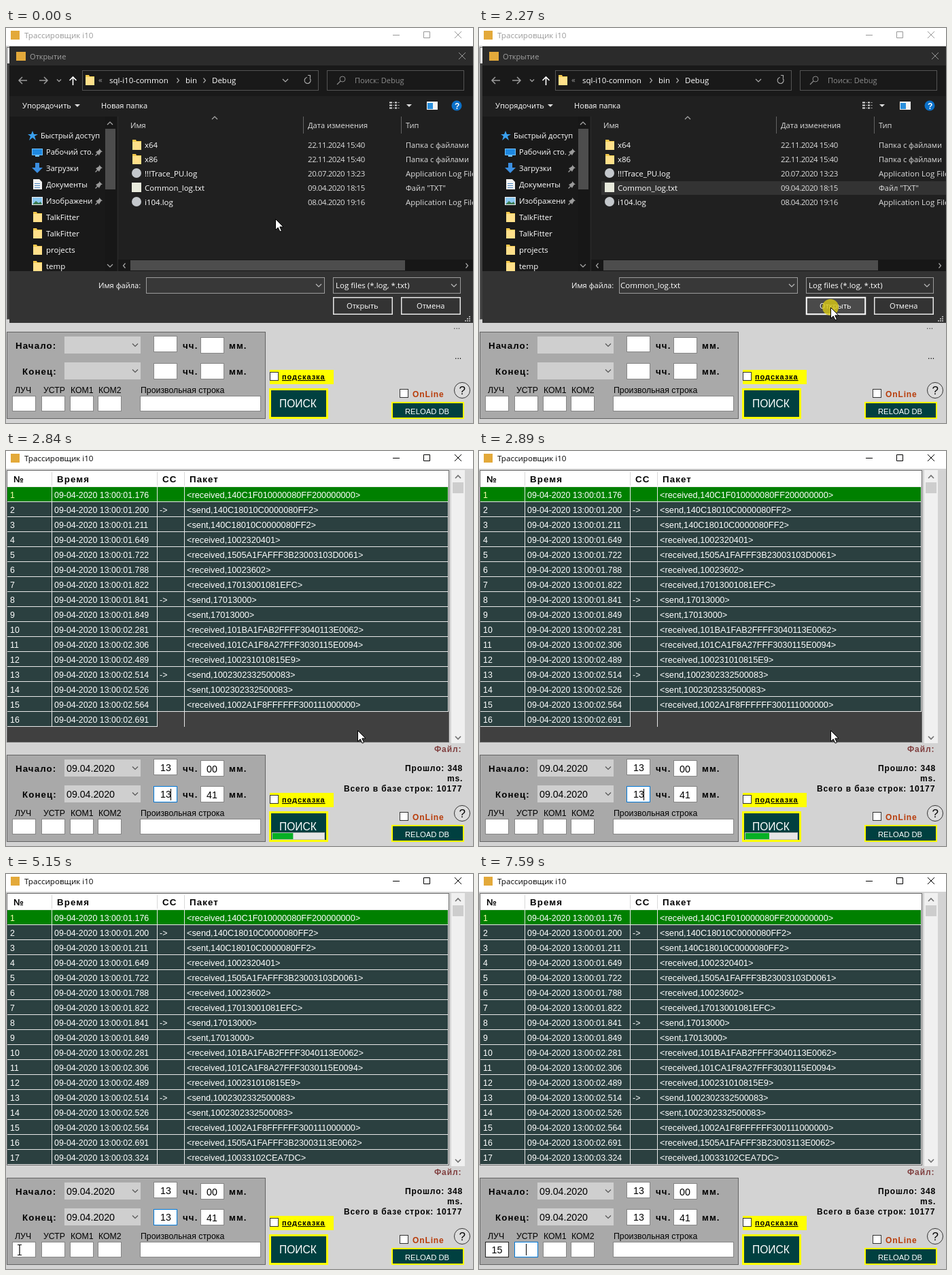
An HTML page for the animation above (8 s loop, 687 by 580 pixels).

```html
<!DOCTYPE html>
<html lang="ru">
<head>
<meta charset="utf-8">
<title>Трассировщик i10</title>
<style>
html, body { margin: 0; width: 100%; height: 100%; overflow: hidden; background: #d3d3d3; }
svg { display: block; width: 687px; height: 580px; }
text { white-space: pre; font-family: "Liberation Sans", sans-serif; }
.ru, .lat, .num { font-family: "Open Sans", "Noto Sans", sans-serif; }
.ru { font-size: 11.1px; }
.lat { font-size: 11.5px; }
.num { font-size: 11.5px; letter-spacing: -.45px; }
.date { font-size: 12.4px; }
.packet { font-size: 12.75px; }
.label { font-size: 12.3px; }
.field { font-size: 14.2px; }
.bold { font-size: 13.3px; font-weight: bold; letter-spacing: 1.1px; }
.note { font-size: 12px; font-weight: bold; letter-spacing: .88px; }
.tip { font-size: 11px; font-weight: bold; letter-spacing: .95px; text-decoration: underline; }
</style>
</head>
<body>
<svg id="stage" viewBox="0 0 687 580"></svg>
<script>
const LOOP = 8000;
const BLUE = '#0078d7';

// Drawing helpers
const attrId = id => id ? ` id="${id}"` : '';
const rect = (x, y, w, h, fill, id) =>
  `<rect${attrId(id)} x="${x}" y="${y}" width="${w}" height="${h}" fill="${fill}"/>`;
const frame = (x, y, w, h, fill, stroke, id, sw = 1) =>
  `<rect${attrId(id)} x="${x + sw / 2}" y="${y + sw / 2}" width="${w - sw}" height="${h - sw}" fill="${fill}" stroke="${stroke}" stroke-width="${sw}"/>`;
const line = (d, color, w = 1) => `<path d="${d}" fill="none" stroke="${color}" stroke-width="${w}"/>`;
const shape = (d, fill) => `<path d="${d}" fill="${fill}"/>`;
const disc = (x, y, r, fill, extra = '') => `<circle cx="${x}" cy="${y}" r="${r}" fill="${fill}" ${extra}/>`;
const group = (id, ...parts) => `<g id="${id}">${parts.flat(9).join('')}</g>`;
const label = (x, y, s, cls, fill = '#000', extra = '') =>
  `<text x="${x}" y="${y}" class="${cls}" fill="${fill}" ${extra}>${s.replace(/</g, '&lt;')}</text>`;
const ui = (x, y, s, fill = '#fff') =>
  label(x, y, s, /[А-я]/.test(s) ? 'ru' : /^\d/.test(s) ? 'num' : 'lat', fill);
const chevron = (x, y, color, dx = 4, dy = 4, w = 1.2) =>
  line(`M${x - dx} ${y - dy / 2}l${dx} ${dy}l${dx} ${-dy}`, color, w);
const sideChevron = (x, y, color, d = 3) =>
  line(`M${x - d / 2} ${y - Math.abs(d) - .5}l${d} ${Math.abs(d) + .5}l${-d} ${Math.abs(d) + .5}`, color, 1.2);
const folder = (x, y) =>
  shape(`M${x} ${y}h5l1 2h7v13h-13z`, '#f5c94c') + shape(`M${x} ${y + 3}h13v12h-13z`, '#ffe08a');

function windowFrame() {
  return [
    rect(0, 0, 687, 26, '#fff'),
    rect(7, 4, 13, 13, '#e3a93a'),
    group('titleInk',
      label(27, 15, 'Трассировщик i10', 'ru', 'currentColor', 'style="font-size:11.6px"'),
      line('M569 10.5h10M614.5 5.5h9v9h-9zM660 5l10 10M670 5l-10 10', 'currentColor')),
    frame(1, 28, 651, 400, '#404040', '#6a6a6a'),
    rect(2, 29, 649, 23, '#fff'),
    line('M67.5 31v20M222.5 31v20M262.5 31v20', '#d8d8d8'),
    label(11, 46, '№', 'bold'), label(75, 46, 'Время', 'bold'),
    label(230, 46, 'СС', 'bold'), label(270, 46, 'Пакет', 'bold'),
    rect(655, 28, 20, 401, '#f0f0f0'),
    chevron(665, 38, '#707070', 4, -4, 1.6), chevron(665, 421, '#707070', 4, 4, 1.6),
  ];
}

const packets = [
  ['1.176', 'received,140C1F010000080FF200000000'], ['1.200', 'send,140C18010C0000080FF2'],
  ['1.211', 'sent,140C18010C0000080FF2'], ['1.649', 'received,1002320401'],
  ['1.722', 'received,1505A1FAFFF3B23003103D0061'], ['1.788', 'received,10023602'],
  ['1.822', 'received,17013001081EFC'], ['1.841', 'send,17013000'], ['1.849', 'sent,17013000'],
  ['2.281', 'received,101BA1FAB2FFFF3040113E0062'], ['2.306', 'received,101CA1F8A27FFF3030115E0094'],
  ['2.489', 'received,100231010815E9'], ['2.514', 'send,1002302332500083'],
  ['2.526', 'sent,1002302332500083'], ['2.564', 'received,1002A1F8FFFFFF300111000000'],
  ['2.691', 'received,1505A1FAFFF3B23003113E0062'], ['3.324', 'received,10033102CEA7DC'],
];

function table() {
  const rows = packets.map(([time, packet], i) => {
    const top = 53 + 22 * i, base = top + 16;
    return [
      rect(2, top, 649, 22, i ? '#2b4040' : '#008000'),
      line(`M2 ${top + 21.5}h649`, '#e8e8e8'),
      label(6, base, String(i + 1), 'date', i ? '#fff' : '#ffffb0'),
      label(71, base, `09-04-2020 13:00:0${time}`, 'date', '#fff'),
      packet.startsWith('send') ? label(226, base, '->', 'date', '#fff') : '',
      label(266, base, `<${packet}>`, 'packet', '#fff'),
    ];
  });
  return group('table', rect(2, 52, 649, 1, '#e8e8e8'), rows,
    line('M67.5 53v374M222.5 53v374M262.5 53v374M650.5 53v374', '#e8e8e8'),
    rect(657, 46, 16, 16, '#cdcdcd'),
    group('unpainted', rect(223, 383, 428, 22, '#404040'), rect(2, 405, 649, 22, '#404040'),
      line('M262.5 383v22', '#e8e8e8')));
}

function controls() {
  const combo = y => rect(86, y, 112, 25, '#cfcfcf') + chevron(190, y + 12.5, '#555', 4, 4);
  const check = (x, y) => frame(x, y, 13, 13, '#fff', '#333');
  const grey = '#868686';
  return [
    frame(1, 446, 381, 128, '#a9a9a9', '#646464'),
    label(14, 471, 'Начало:', 'bold'), label(24, 509, 'Конец:', 'bold'),
    combo(453), combo(491),
    frame(217, 452, 35, 24, '#fff', grey), frame(286, 454, 35, 24, '#fff', grey),
    frame(217, 492, 35, 24, '#fff', grey, 'hour'), frame(286, 492, 35, 24, '#fff', grey),
    [471, 509].map(y => label(260, y, 'чч.', 'bold') + label(328, y, 'мм.', 'bold')),
    label(13, 536, 'ЛУЧ', 'label'), label(55, 536, 'УСТР', 'label'),
    label(95, 536, 'КОМ1', 'label'), label(136, 536, 'КОМ2', 'label'),
    label(198, 536, 'Произвольная строка', 'label'),
    frame(9, 540, 35, 23, '#fff', grey, 'beam'), frame(52, 540, 35, 23, '#fff', grey, 'device'),
    frame(94, 540, 35, 23, '#fff', grey, 'com1'), frame(135, 540, 35, 23, '#fff', grey),
    frame(197, 540, 178, 23, '#fff', grey),
    label(18.5, 557, '', 'field', '#000', 'id="typed"'),
    rect(388, 502, 94, 21, '#ff0'), check(388, 505), label(406, 516, 'подсказка', 'tip'),
    frame(387, 529, 87, 45, '#004040', '#ff0', '', 3),
    label(402, 557, 'ПОИСК', '', '#fff', 'font-size="15.6"'),
    check(579, 530), label(598, 542, 'OnLine', 'note', '#b83c0a'),
    disc(671, 532, 11.5, '#dcdcdc', 'stroke="#333"'),
    label(666.5, 538, '?', '', '#000', 'font-size="17"'),
    frame(567, 549, 107, 25, '#004040', '#ff0', '', 2),
    label(587, 567, 'RELOAD DB', '', '#fff', 'font-size="11.25"'),
    group('dots', label(658, 442, '...', 'label', '#444')),
    group('idle', label(660, 486, '...', 'label')),
    group('building', label(548, 485, 'Формируем базу...', 'note')),
    group('summary',
      label(630, 442, 'Файл:', 'note', '#804040'), label(587, 470, 'Прошло: 348', 'note'),
      label(649, 485, 'ms.', 'note'), label(497, 500, 'Всего в базе строк: 10177', 'note'),
      label(89, 471, '09.04.2020', 'field'), label(89, 509, '09.04.2020', 'field'),
      label(227, 470, '13', 'field'), label(227, 509, '13', 'field'),
      label(295, 472, '00', 'field'), label(295, 510, '41', 'field')),
    group('progress', frame(391, 560, 78, 11, '#e6e6e6', '#bcbcbc'), rect(392, 561, 0, 9, '#06b025', 'bar')),
    group('spinner', Array.from({ length: 12 }, (_, i) =>
      `<path d="M12 0H22" stroke="#000" stroke-width="3" stroke-opacity="${Math.max(.03, 1 - i / 5)}" transform="rotate(${-30 * i})"/>`)),
    rect(0, 0, 1, 17, '#000', 'caret'),
  ];
}

function sidebar() {
  const pin = y => shape(`M137 ${y - 5}l5 5l-2 0l-2 3l-1 2l-2 -2l-3 3l-1 -1l3 -3l-2 -2l2 -1l3 -2z`, '#9a9a9a');
  const pinned = ['Рабочий сто.', 'Загрузки', 'Документы', 'Изображени'];
  const folders = ['TalkFitter', 'TalkFitter', 'projects', 'temp'];
  return [
    shape('M39 151l2 5h6l-5 3l2 6l-5 -4l-5 4l2 -6l-4 -3h5z', '#3aa0ee'),
    ui(51, 162, 'Быстрый доступ'),
    frame(38, 177, 16, 10, '#1e88e0', '#6fc0ff'), rect(43, 187, 6, 2, '#6fc0ff'),
    shape('M43 198h6v7h5l-8 8l-8 -8h5z', '#3b8ee0'),
    shape('M40 222h9l4 4v11h-13z', '#f2f2f2'), line('M42 228.5h8M42 231.5h8M42 234.5h8', '#4a86c0'),
    frame(38, 248, 16, 12, '#8cc8f0', '#f2f2f2'), shape('M39 259l5 -5l4 3l3 -2l2 4z', '#3c7a50'),
    pinned.map((s, i) => ui(59, 186 + 24 * i, s) + pin(182 + 24 * i)),
    folders.map((s, i) => folder(40, 270 + 24 * i) + ui(59, 282 + 24 * i, s)),
    rect(146, 130, 16, 227, '#171717'), rect(146, 148, 15, 89, '#4d4d4d'),
    chevron(153, 140, '#aaa', 4, -4), chevron(153, 349, '#aaa'),
  ];
}

function fileList() {
  const folderKind = 'Папка с файлами', logKind = 'Application Log File';
  const files = [
    ['x64', '22.11.2024 15:40', folderKind], ['x86', '22.11.2024 15:40', folderKind],
    ['!!!Trace_PU.log', '20.07.2020 13:23', logKind], ['Common_log.txt', '09.04.2020 18:15', 'Файл "TXT"'],
    ['i104.log', '08.04.2020 19:16', logKind],
  ];
  return [
    line('M437.5 130v25M581.5 130v25', '#636363'), chevron(307, 132, '#aaa', 4, -4),
    ui(183, 147, 'Имя', '#dedede'), ui(444, 147, 'Дата изменения', '#dedede'), ui(588, 147, 'Тип', '#dedede'),
    rect(180, 225, 507, 20, 'none', 'txtRow'), rect(180, 246, 507, 20, 'none', 'logRow'),
    files.map(([name, date, kind], i) => {
      const y = 172 + 21 * i;
      const icon = kind === folderKind ? folder(186, y - 8)
        : kind === logKind ? disc(192, y - 1, 7, '#c4c8cc') : rect(185, y - 8, 14, 14, '#e8eadc');
      return icon + ui(204, y + 4, name) + ui(444, y + 4, date, '#dedede') + ui(588, y + 4, kind, '#dedede');
    }),
    rect(165, 340, 522, 17, '#171717'), rect(183, 341, 404, 15, '#4d4d4d'),
    sideChevron(174, 349, '#aaa', -3), sideChevron(678, 349, '#aaa'),
  ];
}

function dialog() {
  const edge = '#9b9b9b';
  return group('dialog',
    rect(5, 27, 682, 406, '#202020'), rect(5, 27, 682, 28, '#2b2b2b'),
    rect(5, 55, 682, 45, '#191919'), rect(5, 130, 159, 227, '#191919'),
    rect(164, 130, 1, 227, '#2d2d2d'), rect(5, 357, 682, 76, '#333'),
    rect(15, 35, 14, 13, '#e3a93a'), ui(35, 46, 'Открытие', '#a0a0a0'),
    line('M666 36l10 10M676 36l-10 10', '#9a9a9a'),
    line('M31 77h-12m5 -5l-5 5l5 5M49 77h12m-5 -5l5 5l-5 5', '#9a9a9a', 1.5),
    chevron(78, 77, '#9a9a9a', 3, 3, 1.5), line('M98.5 84v-12m-5 5l5 -5l5 5', '#fff', 1.6),
    frame(112, 62, 348, 30, '#191919', '#535353'), folder(117, 69), ui(136, 80, '«', '#9a9a9a'),
    ui(152, 81, 'sql-i10-common'), sideChevron(253, 77, '#aaa'), ui(264, 81, 'bin'),
    sideChevron(292, 77, '#aaa'), ui(303, 81, 'Debug'), chevron(411, 77, '#aaa'),
    line('M447 74a4.5 4.5 0 1 1 -4 -1.5m1 -3h3.5v4', '#aaa', 1.2),
    frame(472, 62, 202, 30, '#191919', '#535353'),
    disc(495, 75, 4, 'none', 'stroke="#8a8a8a"'), line('M492 78l-5 5', '#8a8a8a', 1.3),
    ui(513, 81, 'Поиск: Debug', '#8a8a8a'),
    ui(24, 118, 'Упорядочить'), shape('M101 112h8l-4 4z', '#ddd'), ui(140, 118, 'Новая папка'),
    line('M564 109.5h4M564 113.5h4M564 117.5h4M572 109.5h3M572 113.5h3M572 117.5h3', '#ddd', 2),
    line('M569 109.5h2M569 113.5h2M569 117.5h2M576 109.5h3M576 113.5h3M576 117.5h3', '#888'),
    shape('M589 112h8l-4 4z', '#ddd'),
    rect(619, 108, 16, 12, '#f4f4f4'), rect(620, 110, 8, 9, '#2b90dd'),
    disc(663, 114, 7.5, '#0b70c8'), label(660, 118.5, '?', '', '#fff', 'font-size="12" font-weight="bold"'),
    sidebar(), fileList(),
    ui(136, 382, 'Имя файла:'), frame(206, 366, 263, 24, '#383838', edge), chevron(460, 378, '#bbb'),
    rect(209, 370, 91, 16, BLUE, 'nameMark'), group('fileName', ui(208, 382, 'Common_log.txt')),
    frame(481, 366, 188, 24, '#333', edge), ui(485, 382, 'Log files (*.log, *.txt)'), chevron(659, 378, '#bbb'),
    frame(481, 395, 88, 26, '#333', '#e8e8e8', 'open', 1.5), ui(501, 412, 'Открыть'),
    frame(581, 395, 88, 26, '#333', '#e8e8e8', '', 1.5), ui(604, 412, 'Отмена'),
    [0, 1, 2].map(i => [0, 1, 2].slice(i).map(j => rect(675 + 3 * j, 429 - 3 * i, 2, 2, '#aaa'))));
}

document.getElementById('stage').innerHTML = [
  rect(0, 0, 687, 580, '#d3d3d3'), windowFrame(), table(), controls(), dialog(),
  group('click', disc(0, 0, 12, '#d8c814', 'fill-opacity=".8"')),
  group('arrow', '<path d="M.5 .5V16.5L4.2 13L7 19L9.5 18L6.8 12H12Z" fill="#fff" stroke="#000"/>'),
  group('ibeam', line('M-3 -7.5h2.5l.5 .7l.5 -.7h2.5M0 -7v14M-3 7.5h2.5l.5 -.7l.5 .7h2.5', '#000', 1.2)),
].flat(9).join('');

const el = id => document.getElementById(id);
const show = (id, on) => { el(id).style.display = on ? '' : 'none'; };
const set = (id, name, value) => el(id).setAttribute(name, value);
const within = (t, a, b) => t >= a && t < b;

// Pointer path: time, x, y
const path = [
  [0, 396, 280], [220, 396, 280], [590, 256, 233], [770, 255, 232], [1520, 255, 232], [2020, 517, 410],
  [3470, 517, 410], [3600, 430, 450], [3750, 260, 522], [3900, 150, 556], [4070, 60, 553], [4140, 27, 552],
  [4210, 10, 552], [4470, 17, 552], [4610, 18, 552], [5350, 21, 552], [6080, 22, 551], [6150, 39, 549], [LOOP, 39, 549],
];

function pointer(t) {
  const i = path.findIndex(p => p[0] > t);
  const [t0, x0, y0] = path[i - 1], [t1, x1, y1] = path[i];
  let k = (t - t0) / (t1 - t0);
  if (t < 3000) k = k * k * (3 - 2 * k);
  return [x0 + (x1 - x0) * k, y0 + (y1 - y0) * k];
}

function drawPointer(t, x, y) {
  const inBeam = within(x, 9, 44), inCom1 = within(x, 94, 129);
  const overField = t > 3470 && y > 540 && y < 563 &&
    (inBeam || inCom1 || within(x, 52, 87) || within(x, 135, 170));
  show('arrow', !overField);
  show('ibeam', overField && t < 7140);
  const place = `translate(${Math.round(x)} ${Math.round(y)})`;
  ['arrow', 'ibeam', 'click'].forEach(id => set(id, 'transform', place));
  show('click', within(t, 1200, 1270) || within(t, 2270, 2340) || within(t, 5650, 5820));
}

function drawDialog(t, x, y) {
  show('dialog', t < 2510);
  const k = Math.min(1, Math.max(0, (t - 2340) / 170));
  set('dialog', 'opacity', (1 - k) ** 1.3);
  set('dialog', 'transform', `translate(335 205) scale(${1 - .06 * k}) translate(-335 -205)`);
  set('txtRow', 'fill', t >= 2270 ? '#333' : t >= 1200 ? '#777' : within(y, 225, 246) ? '#4d4d4d' : 'none');
  set('logRow', 'fill', within(y, 246, 267) && x < 390 && t < 1000 ? '#4d4d4d' : 'none');
  show('fileName', t >= 1200);
  show('nameMark', t >= 2340);
  set('open', 'fill', x > 481 && y > 395 ? '#4a4a4a' : '#333');
  set('open', 'stroke', t >= 1200 ? '#fff' : '#e8e8e8');
  set('open', 'stroke-width', t >= 1200 ? 2 : 1.5);
}

function drawResults(t) {
  el('titleInk').style.color = t < 2390 ? '#999' : '#000';
  const loaded = t >= 2840;
  show('table', loaded);
  show('unpainted', t < 2960);
  show('summary', loaded);
  show('dots', !loaded);
  show('idle', t < 2390);
  show('building', within(t, 2390, 2840));
  show('spinner', within(t, 2390, 2840));
  set('spinner', 'transform', `translate(430 477) rotate(${-15 + 30 * Math.floor((t - 2450) / 70)})`);
  show('progress', within(t, 2390, 2960));
  set('bar', 'width', Math.max(0, Math.min(35, (t - 2520) / 370 * 35)));
}

function drawFields(t) {
  const focus = t < 2840 ? '' : t < 5820 ? 'hour' : t < 7500 ? 'beam' : 'device';
  ['hour', 'beam', 'device'].forEach(id => set(id, 'stroke', id === focus ? BLUE : '#868686'));
  if (t >= 7500) set('beam', 'stroke', '#222');
  set('com1', 'stroke', within(t, 3930, 4280) ? '#333' : '#868686');
  el('typed').textContent = t < 7140 ? '' : t < 7330 ? '1' : '15';
  set('typed', 'x', t < 7330 ? 22.5 : 18.5);

  const typing = t >= 7140;
  const caretOn = within(t, 2840, 3470) || within(t, 4300, 4830) || within(t, 5350, 6350) || t >= 6890;
  show('caret', caretOn);
  const [x, y] = focus === 'hour' ? [242, 496]
    : focus === 'device' ? [69, 543] : [typing ? (t < 7330 ? 31 : 35) : 26, 542.5];
  set('caret', 'x', x);
  set('caret', 'y', y);
}

function render(now) {
  const t = now % LOOP;
  const [x, y] = pointer(t);
  drawPointer(t, x, y);
  drawDialog(t, x, y);
  drawResults(t);
  drawFields(t);
}

const start = performance.now();
function tick() {
  render(performance.now() - start);
  requestAnimationFrame(tick);
}
tick();
</script>
</body>
</html>
```
